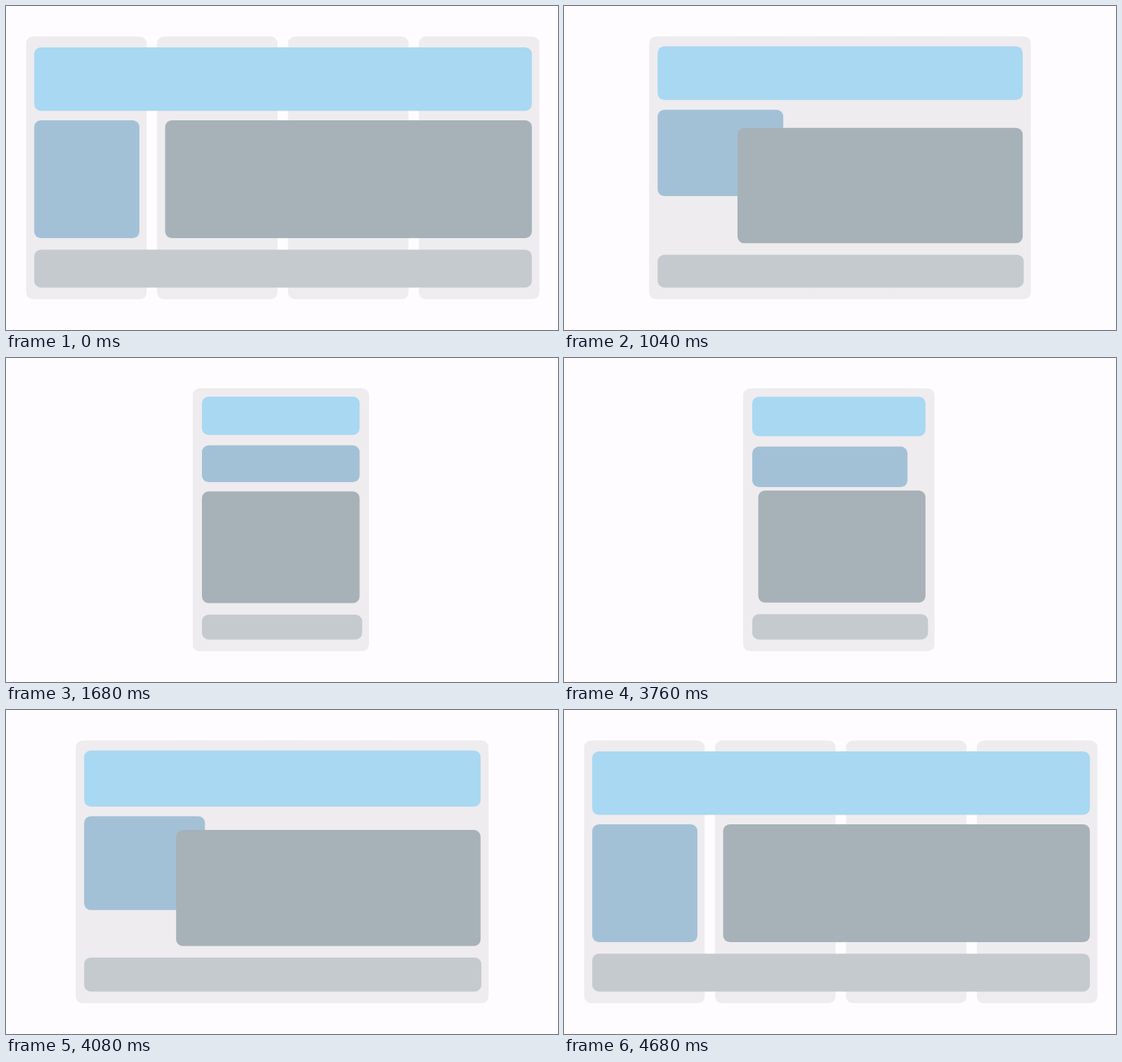
Recreate the animation shown at these times as an HTML page with a canvas. Size 786x462 px, loop 4.88 s.

```html
<!DOCTYPE html>
<html lang="en">
<head>
<meta charset="utf-8">
<title>Responsive columns</title>
<style>
  html, body { margin: 0; width: 100%; height: 100%; overflow: hidden; background: #fefcff; }
  canvas { display: block; }
</style>
</head>
<body>
<canvas id="stage" width="786" height="462"></canvas>
<script>
const ctx = document.getElementById('stage').getContext('2d');
const LOOP = 4880, STEP = 40, COLUMNS = 4;

const bezier = (a, b, u) => 3 * a * u * (1 - u) ** 2 + 3 * b * u * u * (1 - u) + u ** 3;

function ease(x) {
  if (x <= 0) return 0;
  if (x >= 1) return 1;
  let lo = 0, hi = 1;
  for (let i = 0; i < 24; i++) {
    const mid = (lo + hi) / 2;
    if (bezier(0.2, 0.22, mid) < x) lo = mid; else hi = mid;
  }
  return bezier(0.16, 1, lo);
}

// 0 = wide layout, 1 = narrow layout
const narrowness = t => ease((t - 880) / 800) - ease((t - 3720) / 960);

function box(color, left, top, right, bottom) {
  ctx.fillStyle = color;
  ctx.beginPath();
  ctx.roundRect(left, top, right - left, bottom - top, 9.5);
  ctx.fill();
}

function draw(t) {
  const p = narrowness(t);
  const mix = (wide, narrow) => wide + (narrow - wide) * p;
  ctx.fillStyle = '#fefcff';
  ctx.fillRect(0, 0, 786, 462);

  // Columns slide together until they overlap completely
  const width = mix(171.6, 250.5);
  const columnX = i => mix(28.7 + 186.4 * i, 266);
  for (let i = 0; i < COLUMNS; i++) {
    box('#eeecee', columnX(i), 43.6, columnX(i) + width, 418);
  }

  const left = i => columnX(i) + mix(11.5, 13);
  const right = i => columnX(i) + width - mix(10.7, 13);

  // Header and sidebar stack from the top, footer and main from the bottom
  const headTop = mix(59, 55);
  const headBottom = headTop + mix(90.6, 54.7);
  const sideTop = headBottom + mix(13.4, 14.9);
  const footBottom = 401.4;
  const footTop = footBottom - mix(54, 35.4);
  const mainBottom = footTop - 16.4;

  box('#a9d8f2', left(0), headTop, right(3), headBottom);
  box('#a3c1d6', left(0), sideTop, right(0) + mix(0.4, 0), sideTop + mix(168, 52.4));
  box('#a7b2b8', left(1), mainBottom - mix(168, 159.3), right(3), mainBottom);
  box('#c5cace', left(0), footTop, right(3) + mix(0, 3.7), footBottom);
}

let start;
function frame(now) {
  start ??= now;
  const t = (now - start) % LOOP;
  draw(Math.floor(t / STEP) * STEP);
  requestAnimationFrame(frame);
}
draw(0);
requestAnimationFrame(frame);
</script>
</body>
</html>
```
